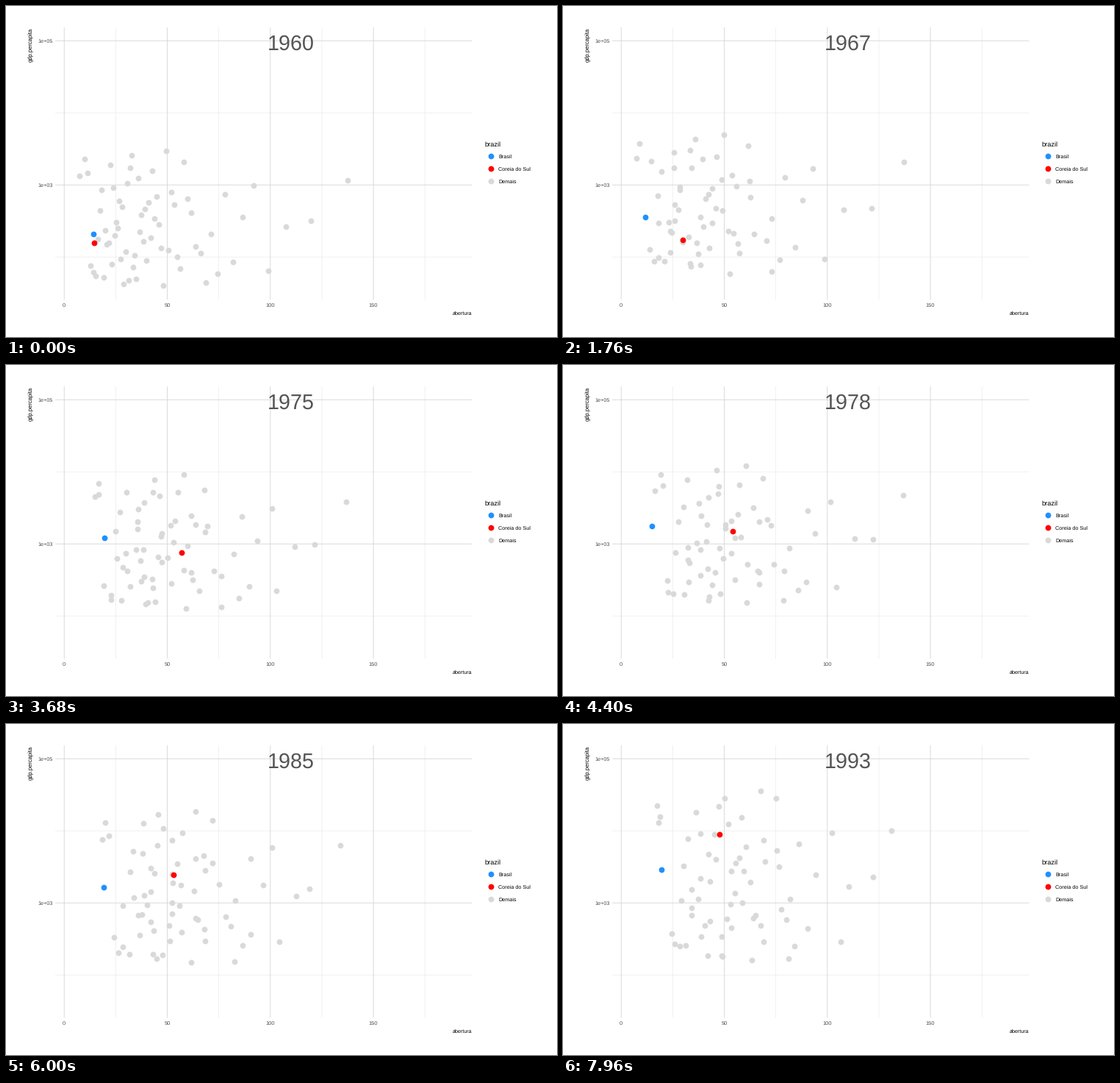
Recreate the animation shown at these times as a matplotlib script. Size 750x450 px, loop 8000 ms.

```python
import numpy as np
import matplotlib.pyplot as plt
from matplotlib.animation import FuncAnimation

W, H, DPI = 750, 450, 100
FRAMES, STEP_MS = 200, 40
YEARS_PER_FRAME = 50 / 299
PT = 72 / DPI                      # points per pixel
GREY, BLUE, RED = "#d9d9d9", "#1e90ff", "#ff0000"
X0, X_UNIT = 79.2, 2.806           # axis zero and pixels per unit of openness
COUNTRIES = 67

plt.rcParams["font.family"] = "Liberation Sans"
plt.rcParams["text.hinting"] = "none"

# Key points of the highlighted countries: years since 1960, x, y
BRAZIL = np.array([
    (0, 119, 310), (3, 128, 296), (7.4, 112, 287), (12.7, 127, 258),
    (14, 140, 243), (18.4, 121, 218.5), (20, 136, 215), (25.1, 133, 222),
    (29.4, 120, 197), (33.3, 134, 198)])
KOREA = np.array([
    (0, 120, 321.5), (1, 131, 343), (5, 143, 337), (7.4, 163.5, 317.5),
    (12.7, 211, 284.5), (14, 242, 268), (18.4, 231, 225.5), (20, 253, 220),
    (25.1, 228, 205), (29.4, 227, 167), (33.3, 213, 150)])


def smooth(t, span):
    s = np.clip(t / span, 0, 1)
    return s * s * (3 - 2 * s)


def yearly_wander(rng, shake, years=35):
    """A small damped random walk per country, one row per year."""
    rows = [np.zeros(COUNTRIES)]
    for _ in range(1, years):
        rows.append(0.75 * rows[-1] + rng.normal(0, shake, COUNTRIES))
    return np.array(rows)


def at_year(rows, t):
    i = int(t)
    return rows[i] + (rows[i + 1] - rows[i]) * (t - i)


rng = np.random.default_rng(7)
open_rank = rng.permutation(np.linspace(0.015, 0.965, COUNTRIES))
open_z = np.log(open_rank / (1 - open_rank)) / 1.6
poverty = rng.permutation(np.linspace(0, 1, COUNTRIES)) ** 0.8
wander_x, wander_y = yearly_wander(rng, 3), yearly_wander(rng, 2.2)


def cloud_at(t):
    """Openness is log-normal and grows; incomes rise and spread apart."""
    opening = smooth(t, 25)
    openness = (38 + 15.5 * opening) * np.exp((0.62 - 0.18 * opening) * open_z)
    top, bottom = 197 - 3.2 * t, 380 - 58 * smooth(t, 20)
    return (X0 + X_UNIT * openness + at_year(wander_x, t),
            top + (bottom - top) * poverty + at_year(wander_y, t))


def track(keys, t):
    return [[np.interp(t, keys[:, 0], keys[:, k])] for k in (1, 2)]


fig = plt.figure(figsize=(W / DPI, H / DPI), dpi=DPI, facecolor="white")
ax = fig.add_axes([0, 0, 1, 1])
ax.set_xlim(0, W)
ax.set_ylim(H, 0)
ax.axis("off")


def grid(first_x, first_y, color, width):
    style = dict(color=color, lw=width * PT, zorder=1, snap=False)
    for x in first_x + 50 * X_UNIT * np.arange(4):
        ax.plot([x, x], [29.5, 399], **style)
    for y in (first_y, first_y + 196):
        ax.plot([67.5, 634], [y, y], **style)


def label(x, y, text, px, color="black", ha="left", va="baseline", **kw):
    return ax.text(x, y, text, fontsize=px * PT, color=color, ha=ha, va=va, **kw)


def dots(color, z, xs=(), ys=()):
    return ax.plot(xs, ys, "o", ms=7.8 * PT, mew=0, color=color, zorder=z)[0]


grid(X0 + 25 * X_UNIT, 145.2, "#ebebeb", 0.7)
grid(X0, 47.2, "#d2d2d2", 0.8)

for i, text in enumerate(["1e+05", "1e+03"]):
    label(64, 50.3 + 196 * i, text, 7.3, "#4d4d4d", "right")
for i in range(4):
    label(X0 + 50 * X_UNIT * i, 409, str(50 * i), 7.5, "#4d4d4d", "center")
label(634, 419.5, "abertura", 7.2, ha="right")
label(33.5, 29.5, "gdp.percapita", 7.6, ha="center", va="top", rotation=90)

label(651, 190.7, "brazil", 9.3)
for i, (color, text) in enumerate([(BLUE, "Brasil"), (RED, "Coreia do Sul"),
                                   (GREY, "Demais")]):
    y = 203.5 + 17.2 * i
    dots(color, 3, [659.5], [y])
    label(670, y + 3, text, 7.3)

year_text = label(388, 59.3, "1960", 28.8, "#555555", "center", zorder=6)
blue_dot, cloud, red_dot = dots(BLUE, 3), dots(GREY, 4), dots(RED, 5)


def draw(frame):
    t = frame * YEARS_PER_FRAME
    year_text.set_text(str(round(1960 + t)))
    cloud.set_data(*cloud_at(t))
    blue_dot.set_data(*track(BRAZIL, t))
    red_dot.set_data(*track(KOREA, t))
    return cloud, blue_dot, red_dot, year_text


anim = FuncAnimation(fig, draw, frames=FRAMES, interval=STEP_MS,
                     repeat=True, repeat_delay=0, blit=False)
plt.show()
```
